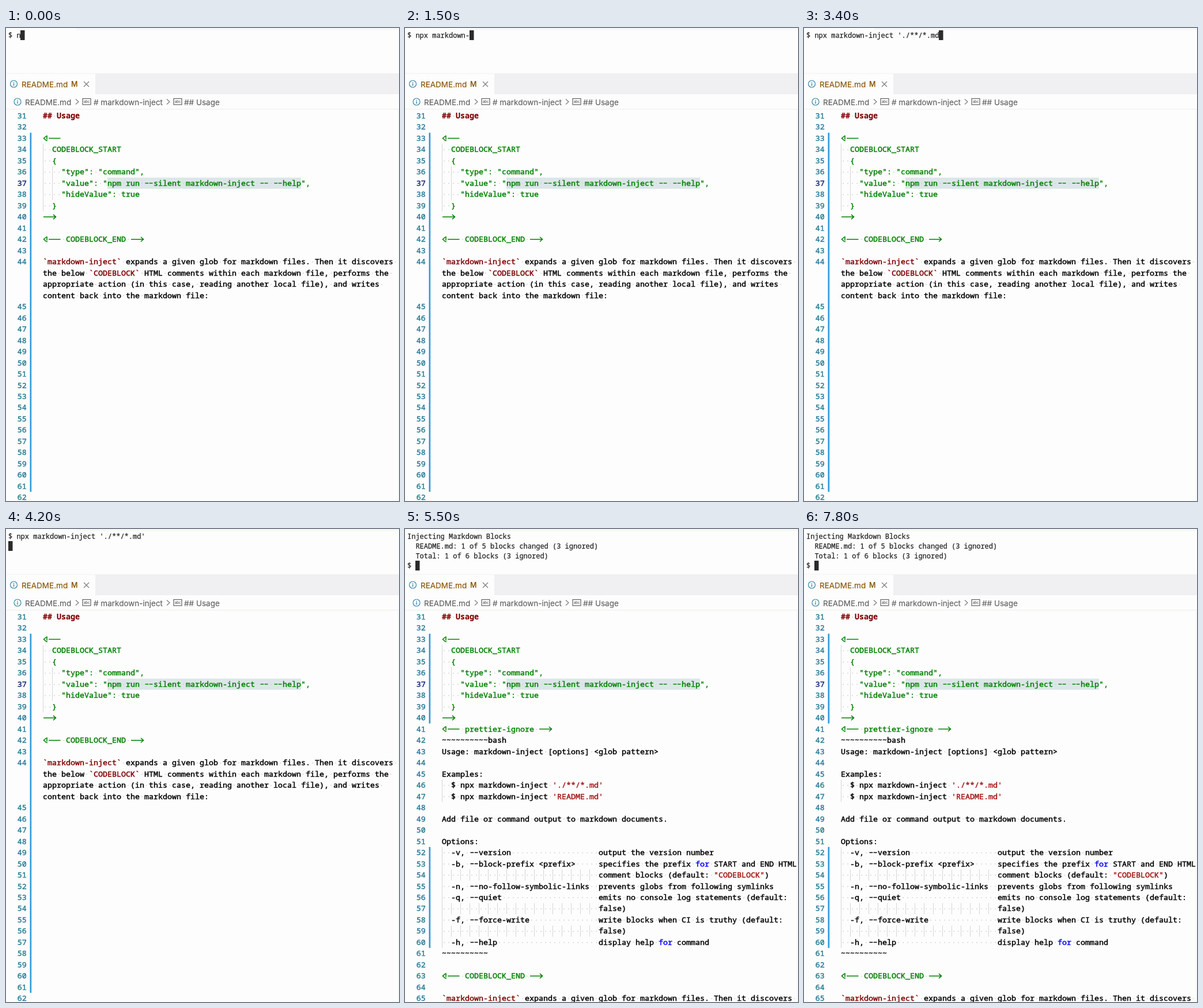
Recreate the animation shown at these times as an HTML page with a canvas. Size 682 by 821 pixels, loop 7.9 s.

```html
<!DOCTYPE html>
<html lang="en">
<head>
<meta charset="utf-8">
<title>Markdown injection demo</title>
<style>
html, body { margin: 0; width: 100%; height: 100%; overflow: hidden; background: #fdfdfd; }
canvas { display: block; }
</style>
</head>
<body>
<canvas id="stage" width="682" height="821"></canvas>
<script>
const ctx = document.getElementById('stage').getContext('2d');
const MONO = '"Noto Sans Mono", "DejaVu Sans Mono", monospace';
const UI = 'Inter, Roboto, sans-serif';
const LOOP = 7900, ENTER = 3800, OUTPUT = 4400, RELOAD = 5200;
const LEFT = 64, COL = 8, TOP = 142.75, ROW = 19.48, BASE = 14.25;
const COLORS = { k: '#000', g: '#008000', r: '#800000', s: '#a31515', b: '#0000ff' };

// Rows are segments split by "|"; the first letter of each picks the colour.
const head = [
  'r## Usage', '', 'g<!--', 'g  CODEBLOCK_START', 'g  {',
  'g    "type": "command",',
  'g    "value": "npm run --silent markdown-inject -- --help",',
  'g    "hideValue": true', 'g  }', 'g-->'
];
const intro = 'r`markdown-inject`|k expands a given glob for markdown files. Then it discovers ';
const before = [
  ...head, '', 'g<!-- CODEBLOCK_END -->', '', intro,
  'kthe below |r`CODEBLOCK`|k HTML comments within each markdown file, performs the ',
  'kappropriate action (in this case, reading another local file), and writes ',
  'kcontent back into the markdown file:'
];
const option = (flags, text) => 'k' + ('  ' + flags).padEnd(34) + text;
const after = [
  ...head, 'g<!-- prettier-ignore -->', 'k~~~~~~~~~~bash',
  'kUsage: markdown-inject [options] <glob pattern>', '', 'kExamples:',
  "k  $ npx markdown-inject |s'./**/*.md'", "k  $ npx markdown-inject |s'README.md'", '',
  'kAdd file or command output to markdown documents.', '', 'kOptions:',
  option('-v, --version', 'output the version number'),
  option('-b, --block-prefix <prefix>', 'specifies the prefix |bfor|k START and END HTML'),
  option('', 'comment blocks (default: |s"CODEBLOCK"|k)'),
  option('-n, --no-follow-symbolic-links', 'prevents globs from following symlinks'),
  option('-q, --quiet', 'emits no console log statements (default:'),
  option('', 'false)'),
  option('-f, --force-write', 'write blocks when CI is truthy (default:'),
  option('', 'false)'),
  option('-h, --help', 'display help |bfor|k command'),
  'k~~~~~~~~~~', '', 'g<!-- CODEBLOCK_END -->', '', intro
];

const command = "npx markdown-inject './**/*.md'";
const output = [
  'Injecting Markdown Blocks',
  '  README.md: 1 of 5 blocks changed (3 ignored)',
  '  Total: 1 of 6 blocks (3 ignored)',
  '$ '
];
// [time, characters typed]
const typing = [[0, 1], [800, 8], [2300, 19], [3400, 30], [3500, 31]];

function rect(x, y, w, h, color) {
  ctx.fillStyle = color;
  ctx.fillRect(x, y, w, h);
}

function line(color, width, ...points) {
  ctx.strokeStyle = color;
  ctx.lineWidth = width;
  ctx.beginPath();
  for (let i = 0; i < points.length; i += 2) ctx.lineTo(points[i], points[i + 1]);
  ctx.stroke();
}

// A thin outline of the given width makes the strokes a little heavier.
function text(str, x, y, font, color, outline = .15) {
  ctx.font = font;
  ctx.fillStyle = ctx.strokeStyle = color;
  ctx.lineWidth = outline;
  ctx.fillText(str, x, y);
  ctx.strokeText(str, x, y);
}

function typedCount(t) {
  for (let i = 1; i < typing.length; i++) {
    const [t0, n0] = typing[i - 1], [t1, n1] = typing[i];
    if (t < t1) return Math.floor(n0 + (n1 - n0) * (t - t0) / (t1 - t0) + 1e-6);
  }
  return command.length;
}

function drawTerminal(t) {
  rect(122, 0, 560, 3.5, '#f7f7f3');
  const lines = t >= OUTPUT ? output : ['$ ' + command.slice(0, typedCount(t))];
  if (t >= ENTER && t < OUTPUT) lines.push('');
  lines.forEach((str, i) => text(str, 4, 17 + i * 17.1, '12px ' + MONO, '#222', .25));
  const last = lines.length - 1;
  rect(Math.floor(4 + lines[last].length * 7.2), 4 + Math.floor(last * 17.1), 7.5, 17, '#2b2b2b');
}

function infoIcon(x, y) {
  ctx.strokeStyle = '#3585a8';
  ctx.lineWidth = 1.2;
  ctx.beginPath();
  ctx.arc(x, y, 6, 0, 7);
  ctx.stroke();
  rect(x - .7, y - 3.2, 1.4, 1.5, '#3585a8');
  rect(x - .7, y - .8, 1.4, 4.2, '#3585a8');
}

function symbolIcon(x) {
  ctx.strokeStyle = '#616161';
  ctx.lineWidth = 1.2;
  ctx.strokeRect(x, 122.5, 14, 10.5);
  text('abc', x + 2, 129.8, '6px ' + UI, '#616161');
}

function drawHeader() {
  rect(155, 79, 527, 36, '#f0f0f3');
  rect(0, 78.5, 682, 1, '#f1f1ef');
  infoIcon(13.5, 97);
  text('README.md', 27, 102.5, '13.5px ' + UI, '#895503');
  text('M', 113, 102, '500 12.5px ' + UI, '#895503');
  line('#777', 1.1, 135, 93, 144, 102);
  line('#777', 1.1, 144, 93, 135, 102);

  infoIcon(20, 128);
  const font = '13.5px ' + UI;
  text('README.md', 33, 133.5, font, '#616161');
  text('# markdown-inject', 152, 133.5, font, '#616161');
  text('## Usage', 309, 133.5, font, '#616161');
  for (const x of [121, 279]) line('#777', 1.1, x, 123.5, x + 5, 128, x, 132.5);
  symbolIcon(133);
  symbolIcon(291);
  rect(0, 140, 682, 1.5, '#f2f2f0');
  rect(680, 142, 1, 679, '#f3f3ef');
}

function ligature(token, x, mid, color) {
  const end = x + token.length * COL - 1.5;
  if (token === '--') {
    line(color, 1.5, x + 1.5, mid, x + 7.3, mid);
    line(color, 1.5, x + 8.7, mid, end, mid);
  } else if (token === '-->') {
    line(color, 1.5, x + 1, mid, end, mid);
    line(color, 1.5, end - 4.5, mid - 4, end, mid, end - 4.5, mid + 4);
  } else {
    line(color, 1.5, x + 6, mid - 4, x + 1.5, mid, x + 6, mid + 4);
    line(color, 1.6, x + 7, mid - 5, x + 7, mid + 2);
    rect(x + 6.1, mid + 3, 1.8, 1.8, color);
    line(color, 1.5, x + 10, mid, end, mid);
  }
}

function drawRow(row, y) {
  const base = y + BASE, mid = base - 4.5;
  let x = LEFT;
  for (const part of row.split('|')) {
    const color = COLORS[part[0]], str = part.slice(1);
    const bold = str.startsWith('##');
    const font = (bold ? 'bold ' : '') + '13.333px ' + MONO;
    for (const token of str.match(/<!--|-->|--| |(?:(?!<!--|--)[^ ])+/g) || []) {
      if (token === ' ') rect(x + 3.3, mid - .4, 1.6, 1.6, '#d0d0d2');
      else if (/^(<!--|-->|--)$/.test(token)) ligature(token, x, mid, color);
      else text(token, x, base, font, color, bold ? .15 : .45);
      x += token.length * COL;
    }
  }
}

function drawEditor(reloaded) {
  const rows = reloaded ? after : before;
  const rowY = i => TOP + i * ROW;
  const bars = reloaded ? [[2, 8], [21, 9]] : [[2, 32]];
  for (const [first, count] of bars) rect(41.5, rowY(first), 2.7, count * ROW, '#329cda');
  rect(LEFT + 14 * COL, rowY(6), 42 * COL, ROW, '#dce6e8');

  for (let i = 0; i < 35; i++) {
    const y = rowY(i), row = rows[i] || '';
    const wrapped = !reloaded && i > 13 && i < 17;
    const number = 31 + i - (!reloaded && i > 16 ? 3 : 0);
    if (!wrapped) {
      text(number, 19.7, y + BASE, '13.333px ' + MONO, number === 37 ? '#0b216f' : '#237893', .4);
    }
    const indent = /^. */.exec(row)?.[0].length - 1 || 0;
    for (let c = 0; c < indent; c += 2) rect(LEFT + c * COL, y, 1, ROW, '#d6d6d6');
    drawRow(row, y);
  }
}

function frame() {
  const t = performance.now() % LOOP;
  rect(0, 0, 682, 821, '#fdfdfd');
  drawTerminal(t);
  drawHeader();
  drawEditor(t >= RELOAD);
  requestAnimationFrame(frame);
}
frame();
</script>
</body>
</html>
```
